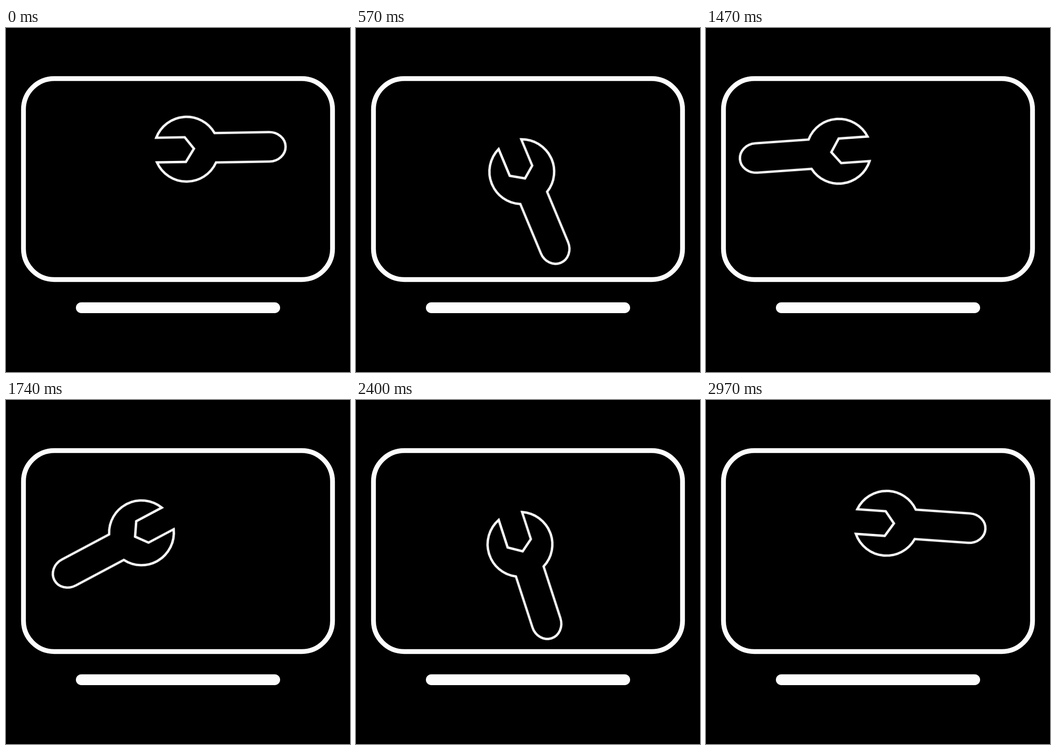
These frames come from a looping animation (748x748 px, 3000 ms). An HTML page:

```html
<!DOCTYPE html>
<html lang="en">
<head>
<meta charset="utf-8">
<title>Monitor with swinging wrench</title>
<style>
  html, body {
    margin: 0;
    width: 100%;
    height: 100%;
    overflow: hidden;
    background: #000;
  }
  svg {
    display: block;
    width: 100%;
    height: 100%;
  }
  .line {
    fill: none;
    stroke: #fdfdfd;
  }
  /* Swing half a turn and back at 30 steps per second. */
  .wrench {
    stroke-width: 5.2;
    transform-origin: 0 0;
    animation: swing 3s steps(45, end) -3.4ms infinite;
  }
  @keyframes swing {
    0%   { transform: rotate(-1deg); }
    50%  { transform: rotate(180deg); }
    100% { transform: rotate(0deg); }
  }
</style>
</head>
<body>
<svg viewBox="0 0 748 748">
  <rect class="line" x="38" y="110" width="672" height="437" rx="67" stroke-width="10.4"/>
  <rect x="152" y="596.5" width="444" height="23.5" rx="11.75" fill="#fdfdfd"/>
  <!-- The pivot lies in the mouth of the jaw. -->
  <g transform="translate(340.5 264.4)">
    <path class="line wrench" d="
      M-13.4 -26
      A70.4 70.4 0 0 1 113.6 -34
      H232
      A35.5 32 0 0 1 232 30
      H115.7
      A70.4 70.4 0 0 1 -12.8 27.6
      H50.2
      L68.2 -.8
      L48.5 -26
      Z"/>
  </g>
</svg>
</body>
</html>
```
